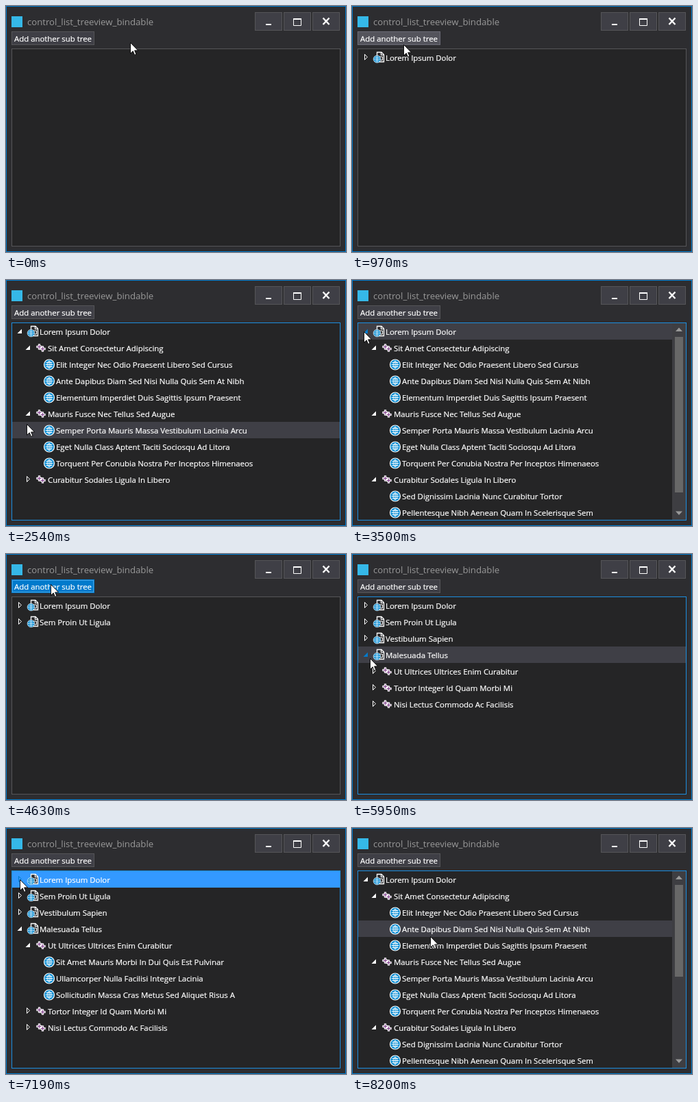
These frames come from a looping animation (496x359 px, 8.61 s). An HTML page:

```html
<!DOCTYPE html>
<html lang="en">
<head>
<meta charset="utf-8">
<title>Tree view</title>
<style>
  html, body { margin: 0; width: 100%; height: 100%; overflow: hidden; background: #2d2d30; }
  svg { display: block; width: 496px; height: 359px; }
  text { font-family: "Open Sans", "Noto Sans", sans-serif; font-size: 11.4px; fill: #fff; stroke: #fff; stroke-width: .22; white-space: pre; }
  .title { font-size: 13.2px; fill: #999; stroke: none; }
  .btn { fill: #3f3f46; stroke: #555558; }
</style>
</head>
<body>
<svg viewBox="0 0 496 359" xmlns="http://www.w3.org/2000/svg">
  <defs>
    <clipPath id="inner"><rect x="9" y="63" width="478" height="287"/></clipPath>

    <g id="globe">
      <circle r="7.5" fill="#0f8fd4" stroke="#fff" stroke-width="1.2"/>
      <g fill="none" stroke="#fff" stroke-width=".9">
        <ellipse rx="2.8" ry="5.2"/>
        <path d="M0-5.2V5.2M-5.5 0H5.5M-4.5-3H4.5M-4.5 3H4.5"/>
      </g>
    </g>

    <g id="doc">
      <path d="M5.5.5H12L15.5 4V14.5H5.5Z" fill="#2d2d30" stroke="#fff" stroke-width="1.3"/>
      <path d="M11.5.5V4.5H15.5" fill="none" stroke="#fff" stroke-width="1.2"/>
      <path d="M9 7H13.5V12H11" fill="none" stroke="#fff"/>
      <circle cx="5.5" cy="10.5" r="5.3" fill="#0f8fd4" stroke="#fff" stroke-width=".7"/>
      <path d="M1 10.5H10M5.5 6V15M2 8H9M2 13H9" fill="none" stroke="#fff" stroke-width=".7"/>
    </g>

    <path id="cross" d="M-1.5-4H1.5V-1.5H4V1.5H1.5V4H-1.5V1.5H-4V-1.5H-1.5Z"/>
    <g id="parts">
      <g fill="#fff" stroke="#fff" stroke-width=".3">
        <use href="#cross" x="4.5" y="4.5"/><use href="#cross" x="9.5" y="7.5"/>
      </g>
      <path d="M4.5 1.5V7.5M1.5 4.5H7.5M9.5 4.5V10.5M6.5 7.5H12.5" fill="none" stroke="#7a3585"/>
    </g>
  </defs>

  <rect x=".5" y=".5" width="495" height="358" fill="#2d2d30" stroke="#007acc"/>
  <rect x="8" y="15" width="16" height="16" fill="#35b8e8"/>
  <text class="title" x="31" y="28">control_list_treeview_bindable</text>

  <g class="btn">
    <rect x="363.5" y="9.5" width="39" height="26"/>
    <rect x="405.5" y="9.5" width="39" height="26"/>
    <rect x="447.5" y="9.5" width="39" height="26"/>
  </g>
  <g fill="none" stroke="#fff">
    <path d="M379 27H387" stroke-width="2"/>
    <path d="M419.5 18V28.5H430.5V18"/>
    <path d="M419 19H431" stroke-width="2"/>
    <path d="M462.5 17.5L471.5 27M471.5 17.5L462.5 27" stroke-width="2.4"/>
  </g>

  <rect id="add" x="8.5" y="37.5" width="120" height="19"/>
  <rect id="ring" x="9.5" y="38.5" width="118" height="17" fill="none" stroke="#8fc9f2" stroke-dasharray="1 1"/>
  <text x="12" y="52">Add another sub tree</text>

  <rect id="box" x="8.5" y="62.5" width="479" height="288" fill="#252526"/>
  <g id="list" clip-path="url(#inner)"></g>

  <path id="cursor" d="M-.5.5V16.3L3.2 12.8L5.6 18.4L8 17.4L5.6 11.9H10.6Z" fill="#fff" stroke="#000" stroke-width=".9"/>
</svg>

<script>
const LOOP = 8610, TOP = 63, ROW = 24, VISIBLE = 12;
const $ = id => document.getElementById(id);
const leaves = (...names) => names.map(name => ({ name }));

// add: time the node appears; open: spans during which it is expanded
const tree = [
  { name: "Lorem Ipsum Dolor", add: 720, open: [[1560, 3750], [7320, LOOP]], kids: [
    { name: "Sit Amet Consectetur Adipiscing", open: [[1930, LOOP]], kids: leaves(
      "Elit Integer Nec Odio Praesent Libero Sed Cursus",
      "Ante Dapibus Diam Sed Nisi Nulla Quis Sem At Nibh",
      "Elementum Imperdiet Duis Sagittis Ipsum Praesent") },
    { name: "Mauris Fusce Nec Tellus Sed Augue", open: [[2460, LOOP]], kids: leaves(
      "Semper Porta Mauris Massa Vestibulum Lacinia Arcu",
      "Eget Nulla Class Aptent Taciti Sociosqu Ad Litora",
      "Torquent Per Conubia Nostra Per Inceptos Himenaeos") },
    { name: "Curabitur Sodales Ligula In Libero", open: [[3000, LOOP]], kids: leaves(
      "Sed Dignissim Lacinia Nunc Curabitur Tortor",
      "Pellentesque Nibh Aenean Quam In Scelerisque Sem",
      "Maecenas Mattis Sed Convallis Tristique") }
  ] },
  { name: "Sem Proin Ut Ligula", add: 4350 },
  { name: "Vestibulum Sapien", add: 4720 },
  { name: "Malesuada Tellus", add: 5070, open: [[5870, LOOP]], kids: [
    { name: "Ut Ultrices Ultrices Enim Curabitur", open: [[6420, LOOP]], kids: leaves(
      "Sit Amet Mauris Morbi In Dui Quis Est Pulvinar",
      "Ullamcorper Nulla Facilisi Integer Lacinia",
      "Sollicitudin Massa Cras Metus Sed Aliquet Risus A") },
    { name: "Tortor Integer Id Quam Morbi Mi" },
    { name: "Nisi Lectus Commodo Ac Facilisis" }
  ] }
];

const presses = [
  [630, 720], [1470, 1560], [1850, 1930], [2370, 2460], [2820, 3000], [3670, 3750],
  [4220, 4350], [4630, 4720], [4990, 5070], [5780, 5870], [6280, 6420], [7190, 7320]
];
const focus = [[1470, 4220], [5780, LOOP]];

// pointer moves: start, end, x, y
const moves = [
  [80, 400, 102, 47], [720, 1400, 19, 76], [1560, 1640, 30, 93], [1640, 1790, 31, 99],
  [1930, 2300, 31, 195], [2460, 2790, 31, 291], [3000, 3500, 18, 75], [3750, 4040, 66, 44],
  [5070, 5720, 19, 147], [5870, 5950, 27, 152], [5950, 6240, 31, 171],
  [6420, 6960, 21, 75], [7640, 8200, 115, 158]
];

const within = (spans, t) => (spans || []).some(([a, b]) => t >= a && t < b);

function pointer(t) {
  let x = 182, y = 53;
  for (const [a, b, nx, ny] of moves) {
    if (t < a) break;
    const p = Math.min(1, (t - a) / (b - a)), e = p * p * (3 - 2 * p);
    x += (nx - x) * e;
    y += (ny - y) * e;
  }
  return { x: Math.round(x), y: Math.round(y) };
}

function flatten(nodes, t, depth = 0, out = []) {
  for (const node of nodes) {
    if (t < (node.add || 0)) continue;
    const open = within(node.open, t);
    out.push({ name: node.name, depth, open });
    if (open) flatten(node.kids, t, depth + 1, out);
  }
  return out;
}

function toggle(x, y, open, color) {
  return open
    ? `<path d="M${x + 6} ${y + 8.5}v6.5h-6.5z" fill="${color}"/>`
    : `<path d="M${x + 1.5} ${y + 7.5}l4 4-4 4z" fill="none" stroke="${color}"/>`;
}

function rowMarkup(row, i, width, hot, down, overToggle) {
  const y = TOP + i * ROW, x = 17 + row.depth * 12;
  let s = hot ? `<rect x="9" y="${y}" width="${width}" height="${ROW}" fill="${down ? "#3399ff" : "#3f3f46"}"/>` : "";
  if (row.depth < 2) s += toggle(x, y, row.open, hot && overToggle ? "#007acc" : "#fff");
  s += row.depth === 0 ? `<use href="#doc" x="31" y="${y + 4}"/>`
     : row.depth === 1 ? `<use href="#parts" x="44" y="${y + 6}"/>`
     : `<use href="#globe" x="63" y="${y + 12.5}"/>`;
  return s + `<text x="${x + 32}" y="${y + 17}">${row.name}</text>`;
}

function scrollbar(count) {
  const size = Math.round(246 * VISIBLE / count);
  return `<rect x="467" y="63" width="20" height="287" fill="#3e3e42"/>
    <path d="M472 75h10l-5-5.5zM472 337.5h10l-5 5.5z" fill="#999"/>
    <rect x="471" y="83" width="12" height="${size}" fill="#686868"/>`;
}

let shown = "";

function draw(t) {
  const { x, y } = pointer(t), down = within(presses, t);
  const overAdd = x >= 8 && x < 129 && y >= 37 && y < 57;
  const add = $("add"), pressed = overAdd && down;
  add.setAttribute("fill", pressed ? "#007acc" : overAdd ? "#54545c" : "#3f3f46");
  add.setAttribute("stroke", pressed ? "#007acc" : overAdd ? "#6a6a75" : "#555558");
  $("ring").setAttribute("visibility", pressed ? "visible" : "hidden");
  $("box").setAttribute("stroke", within(focus, t) ? "#1c8fe0" : "#555558");
  $("cursor").setAttribute("transform", `translate(${x} ${y})`);

  const rows = flatten(tree, t), scrolls = rows.length >= VISIBLE;
  const width = scrolls ? 458 : 478;
  const hot = y >= TOP && x < 9 + width ? Math.floor((y - TOP) / ROW) : -1;
  const markup = rows.slice(0, VISIBLE).map((row, i) => {
    const left = 12 + row.depth * 12;
    return rowMarkup(row, i, width, i === hot, down, x >= left && x < left + 16);
  }).join("") + (scrolls ? scrollbar(rows.length) : "");
  if (markup !== shown) $("list").innerHTML = shown = markup;
}

const start = performance.now();
function tick() {
  draw((performance.now() - start) % LOOP);
  requestAnimationFrame(tick);
}
tick();
</script>
</body>
</html>
```
